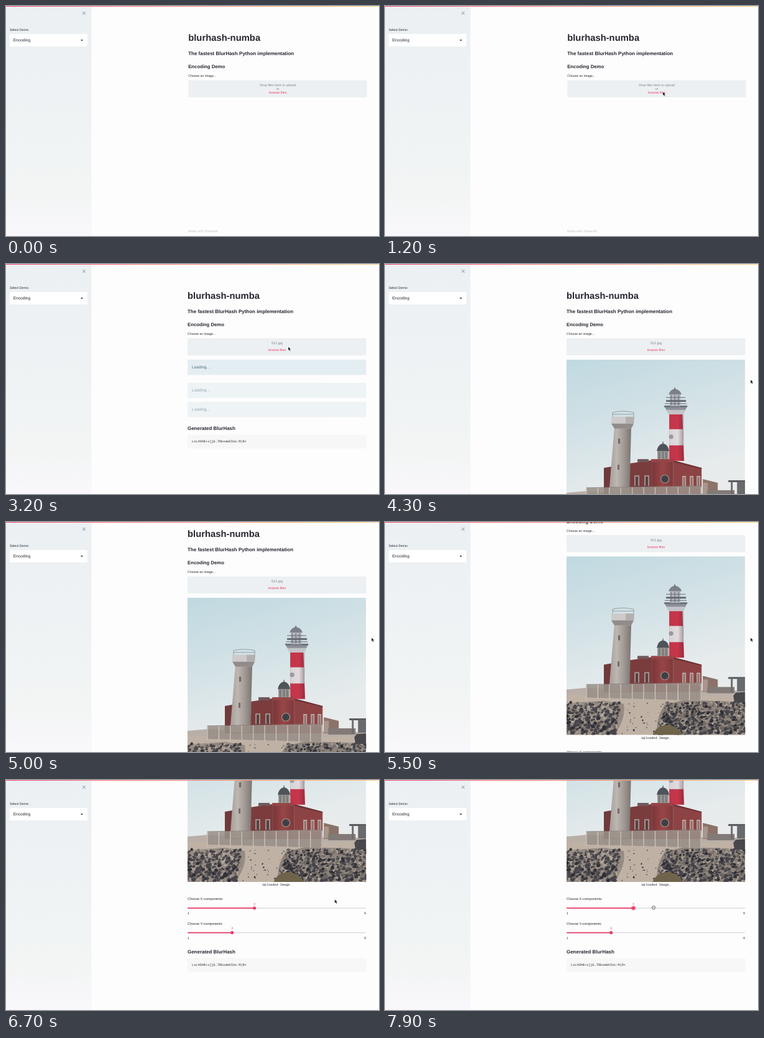
Recreate the animation shown at these times as an HTML page. Size 600x370 px, loop 8000 ms.

```html
<!DOCTYPE html>
<html lang="en">
<head>
<meta charset="utf-8">
<title>blurhash-numba</title>
<style>
html, body { margin: 0; width: 100%; height: 100%; overflow: hidden; background: #fefdfe; }
svg { display: block; width: 600px; height: 370px; }
text { font-family: "Liberation Sans", Arial, sans-serif; text-rendering: geometricPrecision; white-space: pre; }
.b { font-weight: bold; }
.m { font-family: "Liberation Mono", monospace; }
.c { text-anchor: middle; }
</style>
</head>
<body>
<svg id="stage" viewBox="0 0 600 370"></svg>
<script>
const INK = '#262730', RED = '#e83e67', GREY = '#81858f';

const text = (x, y, s, size, fill = INK, cls = '') =>
  `<text x="${x}" y="${y}" font-size="${size}" fill="${fill}" class="${cls}">${s}</text>`;
const rect = (x, y, w, h, fill, more = '') =>
  `<rect x="${x}" y="${y}" width="${w}" height="${h}" fill="${fill}" ${more}/>`;
const path = (d, fill, more = '') => `<path d="${d}" fill="${fill}" ${more}/>`;
const line = (d, stroke, width) => path(d, 'none', `stroke="${stroke}" stroke-width="${width}"`);
const circle = (x, y, r, fill, more = '') => `<circle cx="${x}" cy="${y}" r="${r}" fill="${fill}" ${more}/>`;
const group = (id, body, more = '') => `<g id="${id}" ${more}>${body}</g>`;
const gradient = (id, dir, ...stops) => `<linearGradient id="${id}" ${dir}>` +
  stops.map(([o, c]) => `<stop offset="${o}" stop-color="${c}"/>`).join('') + '</linearGradient>';
const DOWN = 'x2="0" y2="1"';

let seed = 7;
const rnd = () => (seed = seed * 16807 % 2147483647) / 2147483647;

// Loose stones, sparse on the sandy path in the middle
function rocks(count, fill, size) {
  let d = '';
  for (let i = 0; i < count; i++) {
    const v = rnd(), x = rnd() * 287, y = 235 + v * 52;
    const onPath = x > 88 - v * 10 && x < 160 - v * 16;
    if (onPath && rnd() < .9) continue;
    const w = size * (.5 + rnd()) * (onPath ? .5 : .8 + v * .4), h = w * (.4 + rnd() * .4);
    d += `M${x - w / 2} ${y}l${w * .25} ${-h * .8}l${w * .4} ${-h * .2}l${w * .35} ${h * .7}l${-w * .3} ${h * .6}l${-w * .5} 0z`;
  }
  return path(d, fill);
}

function photo() {
  let s = rect(0, 0, 287, 287, 'url(#sky)');
  // land
  s += path('M0 214L34 211L70 214L287 216V287H0z', '#b9afa8') + path('M0 222L150 226L287 222V287H0z', '#bfb2a5');
  s += path('M0 236L60 232L92 237Q96 262 76 287H0z', '#968b82') + path('M287 234L190 231L158 238Q142 262 146 287H287z', '#8d837b');
  // far buildings
  s += path('M219 192L243 198V218H219z', '#8b7369') + rect(219, 198, 8, 19, '#a8958c') + rect(226, 210, 44, 10, '#827a77');
  s += rect(260, 194, 27, 3, '#55575c') + rect(264, 196, 3, 22, '#6d6b6c') + rect(274, 196, 13, 21, '#696a6e');
  // house
  s += path('M60 174L102 167V218H60z', '#6f3a3c') + path('M102 167L137 162V218H102z', '#7a3c3d');
  s += path('M171 162L217 174V218H171z', '#8d4344') + path('M171 162L217 174V176L171 165z', '#6f3537');
  s += rect(114, 160, 18, 5, '#70575a');
  for (const x of [109, 125]) s += rect(x, 186, 8, 17, '#a8908b') + rect(x + 2, 188, 4, 15, '#524143');
  for (const x of [186, 198, 209]) s += rect(x, 187, 6, 17, '#bda8a2') + rect(x + 1.5, 189, 3, 15, '#8e7472');
  // striped tower
  s += path('M165 88H186L189 163H165z', '#c8364b') + path('M165 112H187L188 138H165z', '#e0dcdd');
  s += path('M165 88H188V163H165z', 'url(#round)') + circle(168, 124, 3.6, '#98999e');
  s += path('M157 75H194L188 87H164z', '#8d9098') + rect(157, 74, 37, 2.5, '#666a72');
  s += path('M160 81H191L188 88H164z', '#c3c4c8');
  s += rect(166, 55, 17, 20, '#b4b8bd') + rect(160, 65, 32, 3, '#666a72');
  s += path('M164 56Q167 48 174 47Q182 48 185 56z', '#7c8088') + rect(173.3, 45, 1.6, 5, '#6c7078');
  s += line('M168 57V74M174 57V74M180 57V74M160 61H191M158 71H193', '#656a72', 1);
  // pale tower
  s += path('M77 108H104L101 217H68z', 'url(#stone)') + path('M72 92H109L108 103L104 111H77L72 103z', '#cccaca');
  s += path('M72 103H108L104 111H77z', '#918c8a') + path('M95 92H109L108 103H95z', '#b3b0af');
  s += line('M74 92V85Q91 81 108 85V92M74 88H108', '#77838a', .7);
  s += rect(83, 127, 3, 8, '#6d6765') + rect(82, 169, 3, 8, '#736b67');
  // round front with small lantern
  s += rect(137, 164, 34, 54, 'url(#brick)') + rect(136, 160, 36, 5, '#954547');
  s += rect(146, 146, 18, 14, '#96938f') + path('M145 147Q147 136 155 135Q163 136 165 147z', '#4f545b');
  s += rect(154.4, 132, 1.2, 4, '#4f545b') + line('M149 148V160M155 148V160M160 148V160', '#555b61', 1);
  s += circle(158, 192, 6.5, '#3f4046', 'stroke="#a08582" stroke-width="1.4"');
  // fence
  s += path('M32 206L217 203V233L150 230L32 227z', '#9f958d', 'opacity=".85"');
  let posts = '', bars = '';
  for (let x = 32; x < 218; x += 3) bars += `M${x} 207V${226 + x / 45}`;
  for (let x = 32; x < 218; x += 18.4) posts += `M${x} 205V${228 + x / 45}`;
  s += line(bars, '#857c76', .5) + line(posts, '#d0c9c2', 1.2) + line('M32 206L217 203', '#7c746f', .7);
  s += rocks(420, '#b1a59a', 4) + rocks(520, '#6d6762', 4.5) + rocks(620, '#45434a', 4.5) + rocks(160, '#2f2f35', 5);
  s += path('M140 284Q146 271 164 271Q181 274 187 287H138z', '#70634b');
  s += path('M268 224L272 219L287 218V235H270z', '#48474c');
  return s;
}

function slider(y, label, value) {
  const x = 292 + (value - 1) / 8 * 287;
  return text(292, y - 13, label, 5.5) + rect(292, y - .8, 287, 1.7, '#dfe0e5', 'rx=".8"') +
    rect(292, y - .8, x - 292, 1.7, RED, 'rx=".8"') +
    (value == 4 ? circle(x, y, 3.8, RED, 'id="halo" opacity=".45"') : '') + circle(x, y, 2.6, RED) +
    text(x, y - 5.5, value, 5.2, RED, 'm c') + text(292, y + 10, 1, 5.2, INK, 'm') + text(576, y + 10, 9, 5.2, INK, 'm');
}

const result = y => text(292, y, 'Generated BlurHash', 7.96, INK, 'b') + rect(292, y + 7.5, 287.5, 22, '#f7f7f8', 'rx="1.5"') +
  text(299, y + 20, 'LsL#OhR+x]jG.TRkoeWVIUs:M|R+', 5.24, INK, 'm');
const loading = (y, o) => `<g opacity="${o}">` + rect(292, y, 287.5, 24.7, '#e4eef2', 'rx="1.5"') +
  text(299, y + 14.4, 'Loading...', 6.6, '#4f6d7d') + '</g>';

const stage = document.getElementById('stage');
stage.innerHTML = '<defs>' +
  gradient('side', DOWN, [0, '#ebf0f3'], [.4, '#eff2f4'], [.8, '#f2f5f4'], [1, '#f9f7fb']) +
  gradient('bar', '', [0, '#f6456b'], [.5, '#f98572'], [1, '#ffd080']) +
  gradient('sky', 'x2=".3" y2="1"', [0, '#bfd9e0'], [.4, '#d3e2e6'], [.75, '#e6ebec'], [1, '#ebecec']) +
  gradient('stone', '', [0, '#a39c97'], [.35, '#bdb6b1'], [.65, '#a39b96'], [1, '#7c7470']) +
  gradient('round', '', [0, '#402030" stop-opacity=".05'], [.6, '#402030" stop-opacity="0'], [1, '#402030" stop-opacity=".35']) +
  gradient('brick', '', [0, '#783638'], [.5, '#984547'], [1, '#7f3a3c']) + '</defs>' +
  rect(0, 0, 600, 370, '#fefdfe') +
  group('page',
    text(292, 56, 'blurhash-numba', 14.8, INK, 'b') +
    text(292, 79.3, 'The fastest BlurHash Python implementation', 7.97, INK, 'b') +
    text(292, 100.4, 'Encoding Demo', 7.75, INK, 'b') +
    text(292, 114.4, 'Choose an image...', 5.2) +
    rect(292, 119.5, 287.5, 27.5, '#ecf0f2', 'rx="1.5"') +
    group('drop', text(436, 129.2, 'Drop files here to upload', 5.33, GREY, 'c') +
      text(436, 135.2, 'or', 5.33, GREY, 'c') + text(436, 141.3, 'browse files', 5.35, RED, 'c')) +
    group('upload', text(425.2, 129, 'Uploading...', 5.4, GREY) + text(436, 138.2, 'Cancel', 5.3, RED, 'c') +
      group('spin', line('M0 -1.8A1.8 1.8 0 1 0 1.8 0', '#a3a8b0', .6))) +
    group('file', text(436, 129, '512.jpg', 5.5, GREY, 'c') + text(436, 140.3, 'browse files', 5.35, RED, 'c')) +
    group('wait', loading(153.7, 1) + loading(191, .6) + loading(221.7, .6) + result(267.3)) +
    group('done', `<svg x="292" y="153.7" width="287.3" height="287.3" viewBox="0 0 287 287">${photo()}</svg>` +
      text(436, 447, 'Uploaded Image.', 5.24, INK, 'm c') +
      slider(483, 'Choose X-components:', 4) + slider(522.5, 'Choose Y-components:', 3) + result(556))) +
  group('foot', text(293, 364.2, 'Made with Streamlit', 5.45, '#c3c5cb')) +
  rect(0, 0, 137.5, 370, 'url(#side)') +
  line('M123.3 9.2L127.9 13.8M127.9 9.2L123.3 13.8', '#a3a8b4', 1.1) +
  text(6, 40, 'Select Demo:', 5.2) + rect(6, 45, 125, 20, '#fff', 'rx="1.5"') +
  text(11.7, 57.3, 'Encoding', 6.6) + path('M120 54.3H124L122 56.5z', INK) +
  rect(0, 0, 600, 1, 'url(#bar)') +
  group('mouse',
    group('arrow', path('M0 0V6.2L1.5 4.9L2.6 7.3L3.7 6.8L2.6 4.5H4.5z', '#000', 'stroke="#fff" stroke-width=".5"')) +
    group('hand', path('M-2.4 .6Q-2.6 -2.3 -1 -2.3Q.8 -3 2.2 -1.9Q3 -1 2.4 .8Q2 2.6 .8 2.8H-.8Q-2 2.2 -2.4 .6z', '#fff', 'stroke="#333" stroke-width=".8"') +
      line('M-.8 -.6V.4H1.2', '#333', .6)));

const el = id => document.getElementById(id);
const show = (id, on) => el(id).style.display = on ? '' : 'none';
const move = (id, x, y, more = '') => el(id).setAttribute('transform', `translate(${x} ${y}) ${more}`);

// Keys are [time, ...values]; `ease` shapes each leg.
function track(keys, t, ease = k => k) {
  let i = 0;
  while (i < keys.length - 2 && t > keys[i + 1][0]) i++;
  const [a, b] = [keys[i], keys[i + 1]];
  const k = ease(Math.min(1, Math.max(0, (t - a[0]) / (b[0] - a[0]))));
  return a.slice(1).map((v, j) => v + (b[j + 1] - v) * k);
}
const smooth = k => k * k * (3 - 2 * k);
const pointer = [[100, 601, 149], [900, 447, 138], [1800, 447, 138], [2300, 449, 129.5], [3200, 454, 133],
  [3500, 457, 135], [4200, 588, 186], [6400, 588, 186], [7200, 401, 205], [7500, 401, 205], [7900, 432, 205.3]];
const scroll = [[4750, 0], [5000, 32], [6000, 165], [6300, 277]];

function draw() {
  const t = Math.floor(performance.now() % 8000 / 100) * 100;
  const sent = t >= 1900, loaded = t >= 2800, ready = t >= 3600, grab = t >= 7200;
  show('drop', !sent);
  show('upload', sent && !loaded);
  show('file', loaded);
  show('wait', loaded && !ready);
  show('done', ready);
  show('foot', !loaded);
  show('halo', grab);
  show('arrow', !grab);
  show('hand', grab);
  show('mouse', t >= 100);
  move('page', loaded ? 0 : 1.2, -track(scroll, t)[0]);
  move('mouse', ...track(pointer, t, smooth));
  move('spin', 421, 127.2, `rotate(${t * .48 % 360})`);
  requestAnimationFrame(draw);
}
draw();
</script>
</body>
</html>
```
